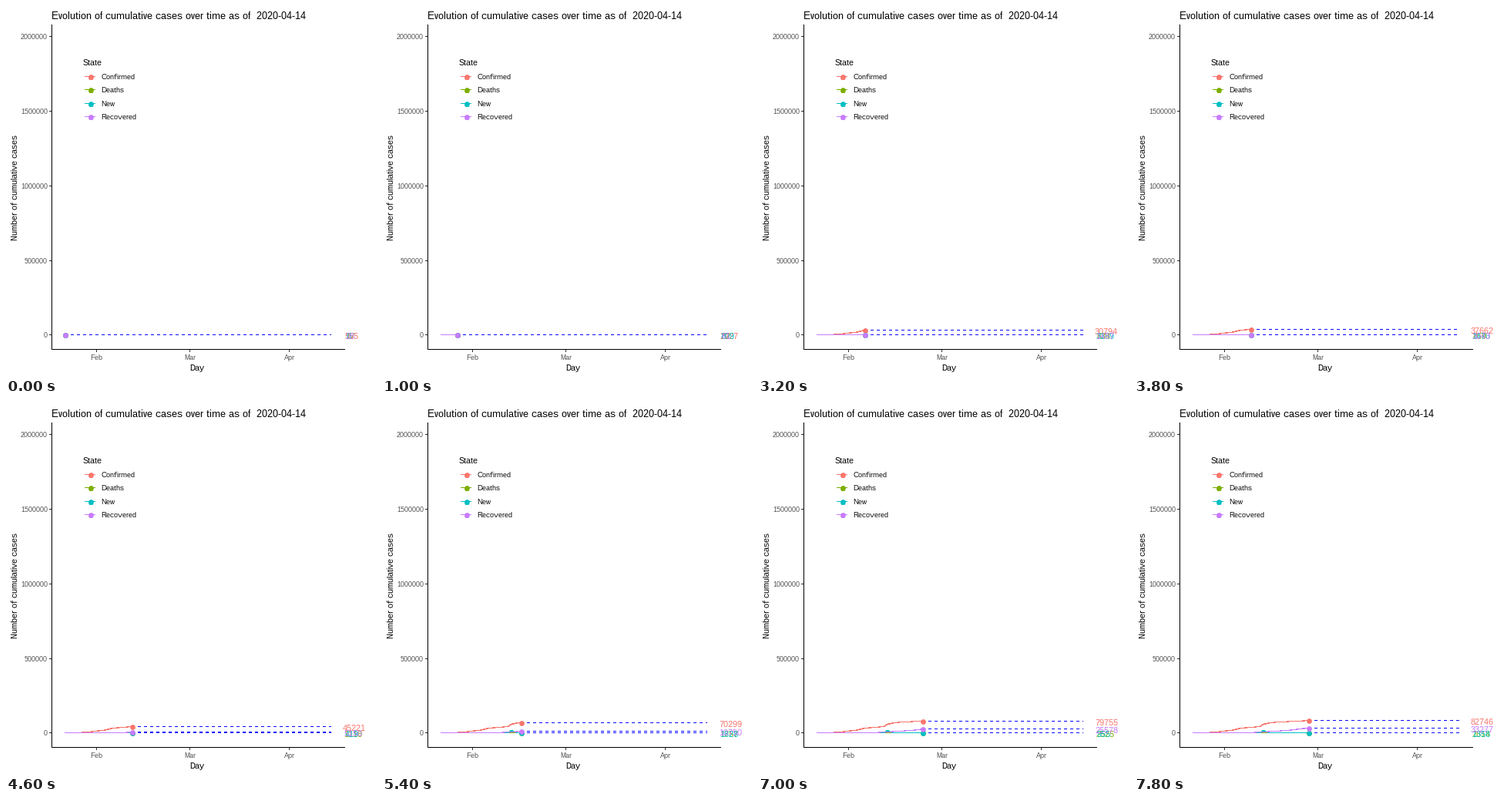
Write a matplotlib script that moves like this. It is 480 px wide and 480 px high and loops after 8 s.

```python
import matplotlib.pyplot as plt
import numpy as np
from matplotlib.animation import FuncAnimation

SIZE, DPI = 480, 100
PX = 72 / DPI  # points per pixel
FRAMES, INTERVAL = 40, 200
DAYS_PER_FRAME = 83 / 89
LAST_DAY = 83
COLORS = {"Confirmed": "#F8766D", "Deaths": "#7CAE00",
          "New": "#00BFC4", "Recovered": "#C77CFF"}

# Key days and the counts reached on them; days between are eased
KEY_DAYS = [0, 5, 10, 15, 21, 22, 24, 30, 36]
KEYS = {
    "Confirmed": [555, 2927, 12038, 30794, 45221, 60368, 69030, 76819, 82746],
    "Deaths": [17, 82, 259, 634, 1118, 1371, 1666, 2251, 2814],
    "New": [0, 809, 2111, 3159, 419, 15147, 2145, 622, 1358],
    "Recovered": [28, 61, 284, 1487, 5150, 6295, 9395, 18890, 33277],
}

plt.rcParams.update({"font.family": "Liberation Sans",
                     "text.hinting": "native", "text.hinting_factor": 1})
fig = plt.figure(figsize=(SIZE / DPI, SIZE / DPI), dpi=DPI, facecolor="white")
ax = fig.add_axes([0, 0, 1, 1])
ax.set_xlim(0, SIZE)
ax.set_ylim(SIZE, 0)
ax.axis("off")


def counts_until(name, day):
    """Daily counts up to a day, growing quadratically between the keys."""
    roots = np.interp(np.arange(day + 1), KEY_DAYS, np.sqrt(KEYS[name]))
    return np.rint(roots ** 2).astype(int)


def centre(v):
    """Centre of the pixel that holds a coordinate."""
    return np.floor(v) + 0.5


def day_x(day):
    return centre(76.3 + 4.166 * day)


def case_y(count):
    return centre(426.8 - count * 387 / 2e6)


def line(xs, ys, color, width=1, **kw):
    return ax.plot(xs, ys, color=color, lw=width * PX, snap=False,
                   solid_capstyle="butt", **kw)[0]


def dot(x, y, color, z):
    return ax.plot([x], [y], "o", color=color, ms=6.8 * PX, mew=0, zorder=z)[0]


def text(x, y, s, size, color="black", **kw):
    return ax.text(x, y, s, fontsize=size * PX, color=color, **kw)


# Axes, ticks and titles
line([59.5, 59.5], [24, 446], "black")
line([59, 440], [445.5, 445.5], "black")
for count in range(0, 2000001, 500000):
    y = case_y(count)
    line([56, 59], [y, y], "#333333")
    text(54, y + 3.5, str(count), 9, "#4D4D4D", ha="right")
for month, day in (("Feb", 10), ("Mar", 39), ("Apr", 70)):
    x = day_x(day)
    line([x, x], [446, 449], "#333333")
    text(x, 459, month, 9, "#4D4D4D", ha="center")
text(59, 17, "Evolution of cumulative cases over time as of  2020-04-14", 13)
text(248, 473, "Day", 11, ha="center")
text(15, 236, "Number of cumulative cases", 11, rotation=90,
     ha="center", va="baseline", rotation_mode="anchor")

# Legend
text(100, 77, "State", 11)
for i, (name, color) in enumerate(COLORS.items()):
    y = centre(91.5 + 17.3 * i)
    line([102, 116], [y, y], color)
    dot(109.5, y, color, 3)
    text(109.5, y + 4.5, "a", 11, color, ha="center")
    text(123, y + 3.5, name, 9)

paths, dashes, dots, labels = {}, {}, {}, {}
for i, (name, color) in enumerate(COLORS.items()):
    z = i / 10
    paths[name] = line([], [], color, 0.5, antialiased=False, zorder=4 + z)
    dashes[name] = line([], [], "#0000ff", ls=(0, (4, 4)), zorder=5 + z,
                        dash_capstyle="butt")
    dots[name] = dot(0, 0, color, 6 + z)
    labels[name] = text(0, 0, "", 11, color, zorder=7 + z)


def update(frame):
    day = int(round(frame * DAYS_PER_FRAME))
    x = day_x(day)
    for name in COLORS:
        counts = counts_until(name, day)
        y = case_y(counts[-1])
        label = str(counts[-1])
        paths[name].set_data(day_x(np.arange(day + 1)), case_y(counts))
        dashes[name].set_data([x - 0.5, day_x(LAST_DAY) - 0.5], [y, y])
        dots[name].set_data([x], [y])
        # Labels hang a fifth of their width left of the anchor
        labels[name].set_position((443 - 1.2 * len(label), y + 5.5))
        labels[name].set_text(label)
    return []


anim = FuncAnimation(fig, update, frames=FRAMES, interval=INTERVAL,
                     init_func=lambda: update(0), repeat=True, repeat_delay=0)
plt.show()
```
